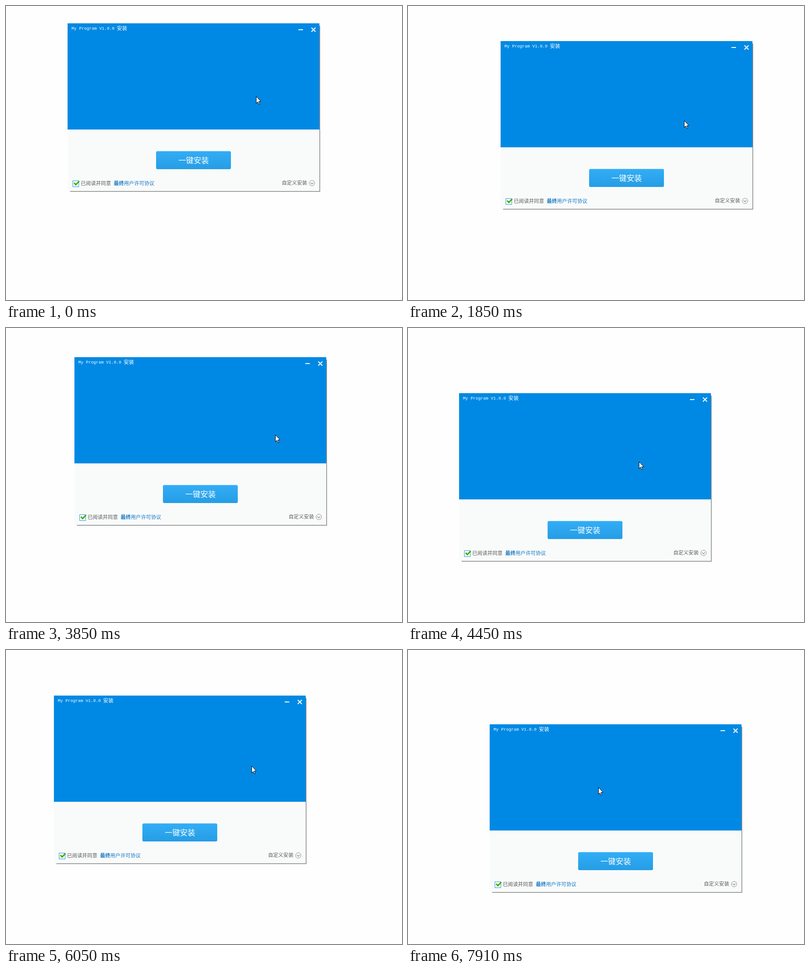
Write an HTML page with a canvas that moves like this. It is 868 by 645 pixels and loops after 8000 ms.

```html
<!DOCTYPE html>
<html lang="zh-CN">
<head>
<meta charset="utf-8">
<title>安装</title>
<style>
html, body { margin: 0; width: 100%; height: 100%; overflow: hidden; background: #fefefe; }
canvas { display: block; width: 868px; height: 645px; }
</style>
</head>
<body>
<canvas id="stage" width="868" height="645"></canvas>
<script>
const ctx = document.getElementById('stage').getContext('2d');
const LOOP = 8000;
const CJK = '"Noto Sans CJK SC", "Noto Sans CJK", sans-serif';
const MONO = '"Liberation Mono", monospace';

// The window is dragged in loose circles: each axis swings between
// turning points [time, position], x a quarter turn apart from y.
const swingX = [
  [250, 135], [1050, 92], [1800, 206], [2300, 102], [3010, 181], [3600, 83],
  [4075, 207], [4650, 77], [5326, 206], [5840, 75], [6500, 206], [7130, 179]
];
const swingY = [
  [250, 38], [800, 50], [1530, 28], [2100, 110], [2600, 56], [3270, 138],
  [3750, 59], [4374, 147], [4880, 74], [5584, 178], [6156, 93], [6750, 171], [7130, 163]
];
const GRAB = { x: 413, y: 160 };
const LEAD = 70; // the pointer runs this many ms ahead of the window

// Cosine ease from 0 to 1 between two times.
function ease(t, from, to) {
  const u = Math.min(Math.max((t - from) / (to - from), 0), 1);
  return (1 - Math.cos(Math.PI * u)) / 2;
}

// Every segment eases independently, so the swings simply add up.
function swing(turns, t) {
  return turns.slice(1).reduce((pos, [time, value], i) => {
    const [prevTime, prevValue] = turns[i];
    return pos + (value - prevValue) * ease(t, prevTime, time);
  }, turns[0][1]);
}

function windowAt(t) {
  return { x: swing(swingX, t), y: swing(swingY, t) };
}

// After the drag the pointer lets go and drifts left.
function pointerAt(t) {
  const held = windowAt(t + LEAD), drift = ease(t, 7220, 7910);
  return { x: held.x + GRAB.x - 175 * drift, y: held.y + GRAB.y - 22 * drift };
}

function tick(t) {
  if (t < 250) return 0;
  const step = (from, size) => from + Math.floor((t - from) / size) * size;
  if (t < 6950) return step(250, 100);
  if (t < 7310) return step(6950, 90);
  return Math.min(step(7310, 100), 7910);
}

function rect(x, y, w, h, color) {
  ctx.fillStyle = color;
  ctx.fillRect(x, y, w, h);
}

function text(str, x, y, font, color) {
  ctx.font = font;
  ctx.fillStyle = color;
  ctx.fillText(str, x, y);
}

function trace(points) {
  ctx.beginPath();
  points.forEach(([x, y]) => ctx.lineTo(x, y));
}

function line(points, color, width) {
  trace(points);
  ctx.strokeStyle = color;
  ctx.lineWidth = width;
  ctx.stroke();
}

function drawTitleBar() {
  rect(0, 0, 552, 233, '#0089e4');
  text('My Program V1.0.0', 8.5, 13.5, '9.25px ' + MONO, '#fff');
  text('安装', 108, 14.5, '11.3px ' + CJK, '#fff');
  rect(506, 13, 10, 2, '#fff');
  line([[534.5, 9.5], [543.5, 18.5]], '#fff', 1.9);
  line([[543.5, 9.5], [534.5, 18.5]], '#fff', 1.9);
}

function drawButton() {
  const fill = ctx.createLinearGradient(0, 281, 0, 320);
  fill.addColorStop(0, '#32adf6');
  fill.addColorStop(1, '#259de5');
  ctx.fillStyle = fill;
  ctx.beginPath();
  ctx.roundRect(194, 280.5, 164, 39.5, 3);
  ctx.fill();
  ctx.textAlign = 'center';
  text('一键安装', 276.3, 306.8, '16.7px ' + CJK, '#fff');
  ctx.textAlign = 'left';
}

function drawFooter() {
  rect(11, 345, 14, 14, '#2b95d6');
  rect(12, 346, 12, 12, '#fff');
  line([[14.2, 350], [18, 354], [25.5, 346.2]], '#3aad08', 3);
  const size = '11.1px ' + CJK, link = '#1878c2';
  text('已阅读并同意', 28.7, 355, size, '#5c5c5c');
  text('最终', 101.3, 355, 'bold ' + size, link);
  text('用户许可协议', 123.5, 355, size, link);
  text('自定义安装', 469.5, 354.4, size, '#5c5c5c');
  ctx.beginPath();
  ctx.arc(535.7, 350.6, 6, 0, Math.PI * 2);
  ctx.strokeStyle = '#8a8a8a';
  ctx.lineWidth = 1;
  ctx.stroke();
  line([[532.5, 349.4], [535.7, 352.6], [538.9, 349.4]], '#777', 1.1);
}

function drawWindow({ x, y }) {
  ctx.save();
  ctx.translate(Math.round(x), Math.round(y));
  rect(5, 5, 549, 365, '#c6c6c6');
  rect(6, 6, 547, 363, '#808080');
  rect(0, 0, 552, 368, '#f9fbfb');
  drawTitleBar();
  drawButton();
  drawFooter();
  ctx.restore();
}

function drawPointer({ x, y }) {
  ctx.save();
  ctx.translate(Math.round(x) + 0.5, Math.round(y) + 0.5);
  trace([[0, 0], [0, 15], [3.4, 11.9], [5.9, 17.4], [8, 16.5], [5.6, 11.1], [10.1, 10.8]]);
  ctx.closePath();
  ctx.fillStyle = '#fff';
  ctx.fill();
  ctx.strokeStyle = '#000';
  ctx.lineWidth = 1;
  ctx.stroke();
  ctx.restore();
}

function draw(time) {
  const t = tick(time % LOOP);
  rect(0, 0, 868, 645, '#fefefe');
  drawWindow(windowAt(t));
  drawPointer(pointerAt(t));
}

const start = performance.now();
function loop() {
  draw(performance.now() - start);
  requestAnimationFrame(loop);
}
loop();
</script>
</body>
</html>
```
